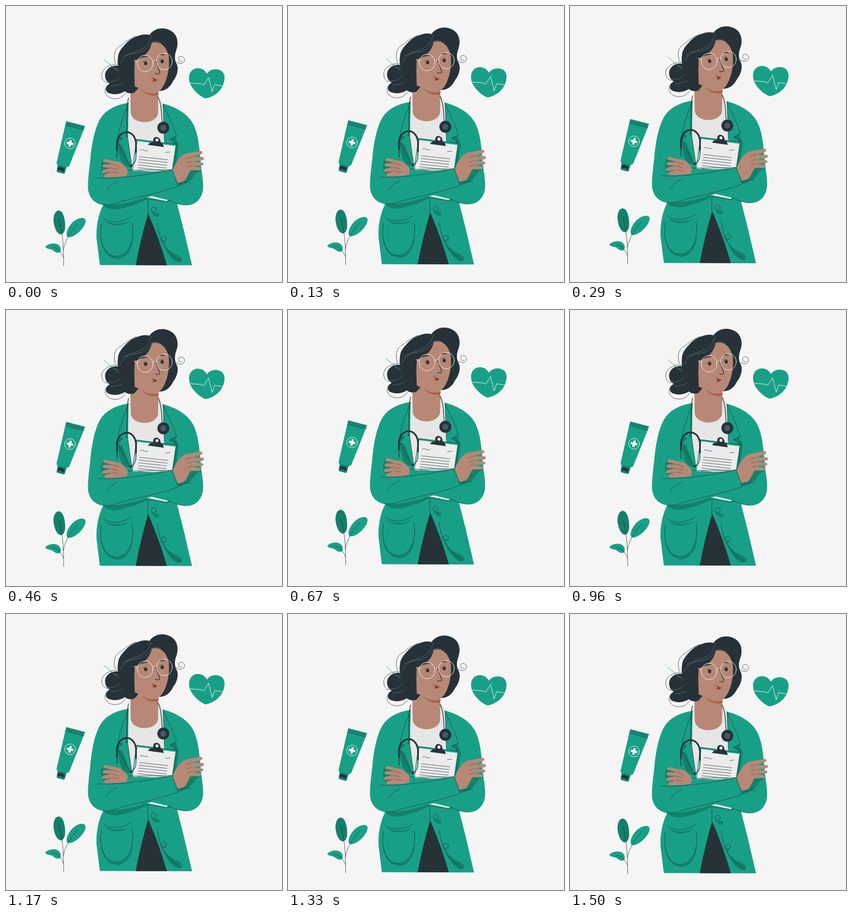
An HTML page for the animation above (1.54 s loop, 500 px wide and 500 px high).

```html
<!DOCTYPE html>
<html lang="en">
<head>
<meta charset="utf-8">
<title>Floating doctor</title>
<style>
  html, body { margin: 0; width: 100%; height: 100%; overflow: hidden; background: #f5f5f5; }
  svg { display: block; width: 100vw; height: 100vh; }
  .green { fill: #18a086; }
  .deep { fill: #13806b; }
  .ink { fill: #263238; }
  .skin { fill: #b78876; }
  .line { fill: none; stroke: #263238; stroke-width: .7; stroke-linecap: round; stroke-linejoin: round; }
  .fine { stroke-width: .45; }
  .bold { stroke-width: 1.2; }
  .pale { fill: none; stroke: #f5f5f5; stroke-width: .9; stroke-linecap: round; stroke-linejoin: round; }
  .strand { fill: none; stroke: #71858e; stroke-width: .6; }
  .tube { fill: none; stroke: #263238; stroke-width: 3; stroke-linecap: round; }
</style>
</head>
<body>
<svg viewBox="0 0 500 500">
<g id="scene">

  <g id="plant">
    <path class="deep" d="M95 370C102 370 106 380 107 393C108 404 106 412 99 413.500C91 411 87 400 86 388C86 378 89 371 95 370Z"/>
    <path class="green" d="M139 383.500C147 384 145 395 137 404C130 413 117 421 111 417.500C107 411 113 399 121 391C127 386 133 383 139 383.500Z"/>
    <path class="green" d="M71 436C75 430 86 428 93 431C99 434 101 441 98 445C95 448 89 446 85 442C81 439 76 441 71 436Z"/>
    <path class="line" d="M104.500 470C104 445 105 420 96 386M130 394C115 410 107 425 104 441M84 436C92 437 100 444 104 455"/>
  </g>

  <g id="ointment">
    <path class="deep" d="M94 286L110 290L106.500 302Q105.500 304 103 303L94 300.500Q91 299.500 92 297Z"/>
    <path class="ink" d="M94 292Q101 290 106 295L104 300Q98 295 93 297Z"/>
    <path class="green" d="M109 208L143.500 217L115 288Q113 292 109 291L94 287.500Q91 286.500 92 282Z"/>
    <path class="line" d="M108 215.500L141 224"/>
    <g id="crimp"></g>
    <circle class="pale" cx="116" cy="248.500" r="9.700"/>
    <path transform="translate(116 248.500) rotate(14)" fill="#fff" d="M-2-6H2V-2H6V2H2V6H-2V2H-6V-2H-2Z"/>
  </g>

  <g id="heart">
    <path class="green" d="M364 122C358 111 345 109 337 116C329 123 331 137 336 145C342 155 352 163 361 167C374 165 388 156 393 143C398 131 397 119 387 115.500C378 112 369 115 364 122Z"/>
    <path class="pale" d="M334 139L354 140.500L358 143L367 129L373.500 155L378 142L391 144"/>
  </g>

  <g id="bun">
    <path class="ink" d="M206 108C190 105 179 115 179.500 126C180 134 184 138 188 140C180 145 178 154 187 157.500C197 161 208 159 215 154Q222 159 230 157L232 135L216 106Z"/>
    <path d="M177 96L206 120" fill="none" stroke="#18a086" stroke-width=".8"/>
    <path class="line" d="M203 105C184 105 170 116 174 129C175 134 179 138 184 138M184 143C176 150 178 166 196 167.500C206 168 213 163 216 157"/>
    <path class="strand" d="M184 136C195 139 207 132 212 120M189 144C202 144 211 141 216 134M194 113C204 112 211 118 213 126"/>
  </g>

  <g id="body">
    <path class="green" d="M222 175C195 179 178 190 169 207C160 225 155 250 152.500 280C149.500 305 147.500 324 149 334C152 349 162 358 176 360C167 377 163 400 164 420L170 468.800L337 469.300L322 405L310 358L326 360.500C346 360 356 346 357 330C358 316 354 300 353 285C350 254 349 235 340 215C331 196 310 183 284 176Z"/>
    <path fill="#e6e6e6" d="M222 174L227 165H279L284 176L287 252L229 298L221 240Z"/>
    <path class="deep" d="M306 236L313 251L306 300L296 290Z"/>
    <path class="green" d="M222 175L220 234L228 296L203 247L212 238L202 234C206 212 211 194 222 175Z"/>
    <path class="deep" d="M203 247L211 252L226 292L213 288Q202 271 203 247Z"/>
    <path class="deep" d="M203 247L212 238L208 237L200 243Z"/>
    <path class="line" d="M222 175C216 192 206 214 203 236L211 239L202 247L227 293M220 234L228 290"/>
    <path class="deep" d="M306 235L296 241L310 248Z"/>
    <path class="line" d="M284 177C294 198 304 218 309 235L296 241L310 248M285 178L287 244"/>
    <path class="ink" d="M257.500 375Q244 421 235 469L291 469.200Q278 423 257.500 375Z"/>
    <path class="line" d="M257 350V375Q278 423 291 469"/>
  </g>

  <g id="pockets">
    <path class="deep" d="M172 420C175 445 184 455 201 458C218 457 229 441 230 419C225 441 216 453 200 454C184 452 177 441 172 420Z"/>
    <path class="deep" d="M178 388C190 401 212 399 227 388C212 395 192 396 178 388Z"/>
    <path class="line" d="M177 384C190 394 209 392 227 381M173 395C169 421 174 444 190 451C205 457 219 447 225 433C230 421 231 404 228 393"/>
    <path class="deep" d="M282 422C288 438 298 446 313 451C320 455 322 462 315 464C303 464 290 448 282 422Z"/>
    <path class="line" d="M274 393C277 420 286 443 315 461"/>
    <path class="deep" d="M263 371C267 376 272 373 276 375C280 378 277 382 273 381C268 380 264 376 263 371Z"/>
    <circle class="green" cx="267.500" cy="368.500" r="4.600"/>
    <circle class="line" cx="267.500" cy="368.500" r="4.600"/>
    <circle class="deep" cx="285" cy="423" r="4.800"/>
    <circle class="green" cx="286" cy="421" r="4.600"/>
    <circle class="line" cx="286" cy="421" r="4.600"/>
  </g>

  <g id="neck">
    <path class="skin" d="M225 145L226 194C228 204 238 210 251 210C264 210 275 203 275.500 193L276 148Z"/>
    <path fill="#b05f47" d="M244 149C254 158 266 160 277 156L275.500 161C263 164 251 159 244 149Z"/>
    <path class="line bold" d="M222 166C217 184 221 220 218 236M275 164C282 175 282 198 283 213"/>
  </g>

  <g id="head">
    <path class="ink" d="M232 157C221 159 207 135 204 114C202 104 202 97 203 92C203 86 207 78 214 71C221 63 227 58 236 55C245 51 253 50 260 52C267 41 284 36 298 44C311 51 313 66 309 78C305 88 305 97 309 104C314 114 309 128 303 135C297 148 287 155 274 153L240 148Z"/>
    <path class="skin" d="M264 66C279 62 291 72 295 92C297 116 290 146 275 155.500C262 159 248 153 240 148L231 144L233 96C247 94 259 84 264 66Z"/>
    <path class="ink" d="M264 66C261 82 250 93 233.500 98C231 115 234 138 233 153C232 158 226 159 219 156L214 92Z"/>
    <path class="strand" d="M211 92C226 81 250 91 263 66C269 62 275 64 281 67M207 104C214 86 234 83 247 77C255 72 259 65 264 53"/>
    <path class="line" d="M198 103C193 84 199 75 210 70C216 64 226 58 236 54M309 101C317 107 324 102 323.500 96C322 89 311 89 313 96C313 99 316 101 319 99"/>
    <path class="skin" d="M238 98C232 97 232 109 238 110Z"/>
  </g>

  <g id="face">
    <ellipse class="ink" cx="253" cy="103.500" rx="2.900" ry="3.200"/>
    <ellipse class="ink" cx="283" cy="100" rx="2.900" ry="3.200"/>
    <path class="line" d="M248 101.500Q250 99 254 99.500M278 97.500Q281 95 285 96"/>
    <path class="ink" d="M245 94C248 90 253 89 258 91C253 91.500 249 92 245 94ZM277 89C280 85 285 85 288 89C285 88 281 88 277 89Z"/>
    <path class="line bold" d="M271 98C273 109 280 118 278 121.500Q275 123.500 271 121.500"/>
    <path fill="#8c3c2c" d="M262 126.500C266 131 270 131.500 274 132.500C272 137 267 137 265 135Q268 134 267 132.500Q264 130 262 126.500Z"/>
    <g fill="#8f5a48">
      <circle cx="287" cy="107" r=".8"/><circle cx="291" cy="104" r=".8"/><circle cx="290" cy="110" r=".7"/>
      <circle cx="247" cy="112" r=".7"/><circle cx="251" cy="114" r=".7"/>
    </g>
    <ellipse class="pale" cx="252" cy="103.500" rx="14.300" ry="15"/>
    <ellipse class="pale" cx="287" cy="100" rx="14.300" ry="15"/>
    <path class="pale" d="M266 101Q269 96 273 99M238 101L232 98"/>
  </g>

  <g id="clipboard">
    <path class="deep" d="M237 241L313 251L305 300L230 298Z"/>
    <path class="green" d="M236 241L309 250L302 300L228 298Z"/>
    <path fill="#ececec" d="M238 244L307 253L300 300H229Z"/>
    <path class="line" d="M236 241L309 250L302 300"/>
    <path class="ink" d="M257 251L261 247L267 246C264 233 281 234 280 247L284 249L286 255ZM273.500 239.500A2.800 2.800 0 1 0 273.500 245.100A2.800 2.800 0 1 0 273.500 239.500Z" fill-rule="evenodd"/>
    <path class="line" d="M243 261Q246 258 250 261L257 262M289 265L297 264"/>
    <g id="notes"></g>
  </g>

  <g id="stethoscope">
    <path class="tube" d="M201 261V248C203 223 232 220 235.500 247V264"/>
    <path class="line bold" d="M235.500 264C236 276 235 284 228 288M201 261V275"/>
    <circle class="ink" cx="226.500" cy="289" r="2.200"/>
    <circle class="ink" cx="285" cy="220" r="10.800"/>
    <circle cx="285" cy="220" r="5.400" fill="#455a64"/>
  </g>

  <g id="arms">
    <path class="deep" d="M176 359C200 362 230 354 253 347L264 345C245 356 224 364 202 368Q180 369 176 359Z"/>
    <path class="green" d="M219 297C248 300 278 300 301 296L315 321L336 319L355 320C357 345 348 360 326 360.500L262 345L200 350L205 308Z"/>
    <path class="deep" d="M246 348L262 344L297 351L294 355.500Z"/>
    <path fill="#ececec" d="M255 346L264 344L294 351L291 353Z"/>
    <path class="deep" d="M312 326L308 319L334 298L352 292L353 298C341 300 340 315 326 321C321 324 316 325 312 326Z"/>
    <path class="deep" d="M176 277C171 286 170 299 177 306L211 307L205 289Z"/>
    <path class="green" d="M152 306C180 315 208 309 222 307L301 296L312 326C276 340 234 348 205 356C187 362 163 361 153 345Q148 330 152 306Z"/>
    <path class="line" d="M166 311C195 314 262 305 301 296L312 326C274 340 229 347 201 356C193 359 183 361 175 359M181 335C187 326 194 321 202 318M219 297L300 296M294 351C303 355 314 359 324 360M314 322C324 319 331 316 335 321"/>
    <path class="skin" d="M221 298C215 287 207 281 198 281L181 277C176 276 174 281 178 282L194 286L180 286C174 286 173 291 178 292L191 293L177 296C172 298 173 303 178 302L193 300L180 304C176 306 178 310 183 310L205 309L219 307Z"/>
    <path class="skin" d="M302 297C306 285 314 272 325 267L352 262C357 262 357 266 353 268L336 273L356 273C360 274 359 279 355 279L337 281L355 283C359 284 358 289 354 288L336 289L351 292C355 293 354 297 350 297L334 297C330 305 326 314 322 317L311 320Z"/>
    <path class="line fine" d="M194 286L205 290M191 293L203 296M193 300L204 302M336 273L326 276M337 281L328 284M336 289L329 291"/>
  </g>
</g>
</svg>
<script>
  const $ = id => document.getElementById(id);

  function rule(parent, x1, y1, x2, y2) {
    const el = document.createElementNS('http://www.w3.org/2000/svg', 'path');
    el.setAttribute('class', 'line');
    el.setAttribute('d', `M${x1} ${y1}L${x2} ${y2}`);
    $(parent).append(el);
  }

  for (let i = 0; i < 13; i++) {
    const x = 111 + i * 2.4, y = 210 + i * 0.62;
    rule('crimp', x, y, x - 1, y + 4.5);
  }
  for (let i = 0; i < 6; i++) {
    const x = 242 - i * 0.8, y = 272.5 + i * 5;
    rule('notes', x, y, x + 51, y + 5.5);
  }

  // Linear float, up and back down, held at 24 steps per second.
  const LOOP = 1540, STEP = LOOP / 37, CYCLE = 1500, RISE = 10, LEAD = 22, BASE = 0.8;

  function lift(ms) {
    const p = (ms + LEAD) % CYCLE / CYCLE;
    return RISE * (1 - Math.abs(1 - 2 * p));
  }

  const start = performance.now();
  function draw() {
    const t = Math.max(0, performance.now() - start) % LOOP;
    const held = Math.min(36, Math.floor((t + 8) / STEP)) * STEP;
    $('scene').setAttribute('transform', `translate(0 ${(BASE - lift(held)).toFixed(3)})`);
    requestAnimationFrame(draw);
  }
  draw();
</script>
</body>
</html>
```
